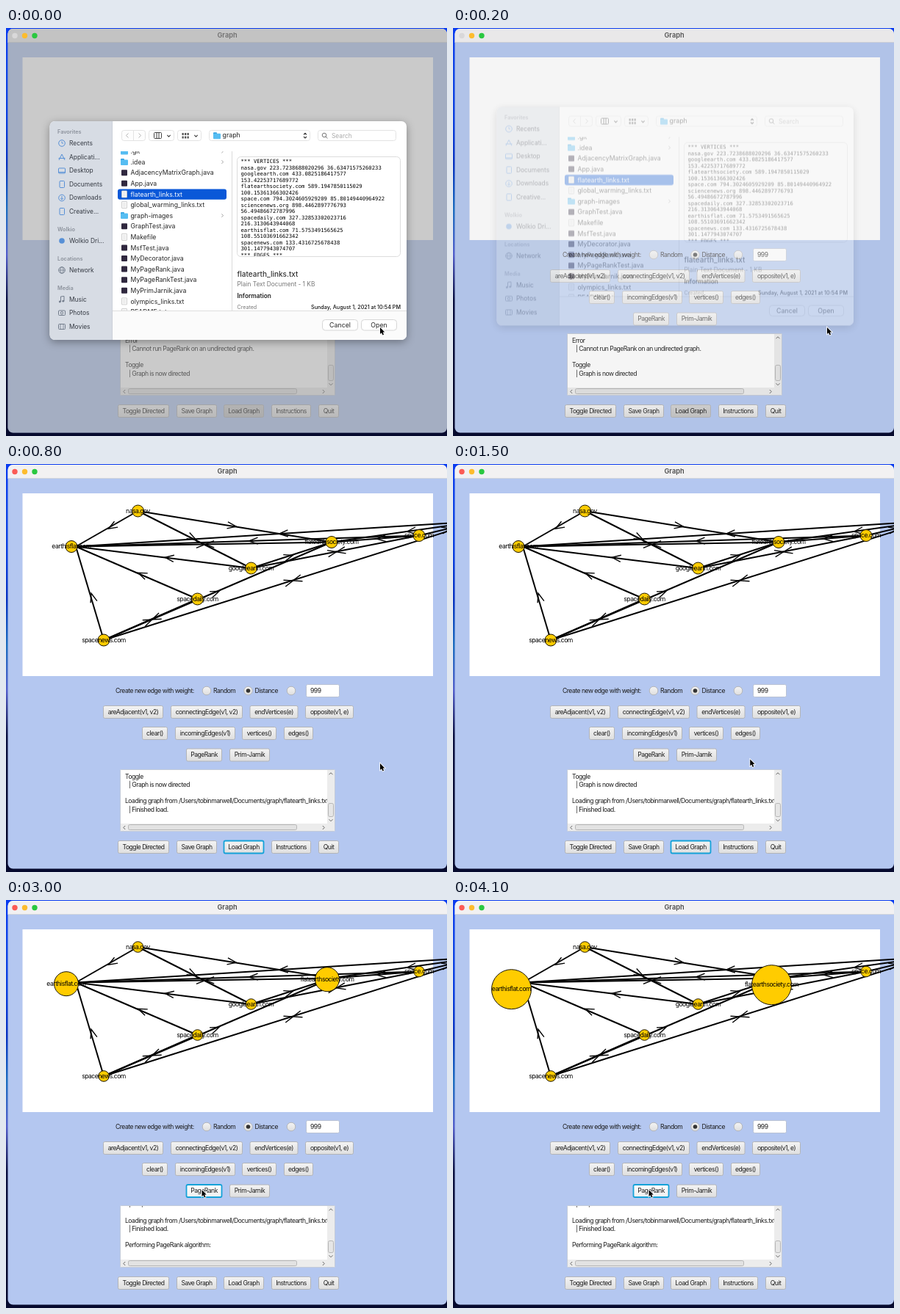
Recreate the animation shown at these times as an HTML page with a canvas. Size 600 by 556 pixels, loop 4200 ms.

```html
<!DOCTYPE html>
<html lang="en">
<head>
<meta charset="utf-8">
<title>Graph</title>
<style>
html, body { margin: 0; width: 100%; height: 100%; overflow: hidden; background: #060a2e; }
canvas { display: block; }
</style>
</head>
<body>
<canvas id="stage" width="600" height="556"></canvas>
<script>
const LOOP = 4200, STEP = 100;
const LOADED = 400, RANKED = 2500;
const stage = document.getElementById('stage').getContext('2d');
let c = stage;

// ---------- helpers ----------
function text(s, x, y, size, color = '#222', weight = 400, align = 'left', spacing = 0, family = 'Inter, sans-serif') {
  c.font = `${weight} ${size}px ${family}`;
  c.letterSpacing = spacing + 'px';
  c.textAlign = align;
  c.textBaseline = 'middle';
  c.fillStyle = color;
  c.fillText(s, x, y);
}
const label = (s, x, y, align, color = '#1c1c1c') => text(s, x, y, 8.6, color, 400, align, -0.5);

function paint(fill, stroke, width) {
  if (fill) { c.fillStyle = fill; c.fill(); }
  if (stroke) { c.strokeStyle = stroke; c.lineWidth = width; c.stroke(); }
}
function box(x, y, w, h, r, fill, stroke, width = 1) {
  c.beginPath();
  c.roundRect(x, y, w, h, r);
  paint(fill, stroke, width);
}
function disc(x, y, r, fill, stroke, width = 1) {
  c.beginPath();
  c.arc(x, y, r, 0, Math.PI * 2);
  paint(fill, stroke, width);
}
function path(points, color, width = 1) {
  c.beginPath();
  points.forEach(([x, y]) => c.lineTo(x, y));
  paint(null, color, width);
}
function clipTo(x, y, w, h, draw) {
  c.save();
  c.beginPath();
  c.rect(x, y, w, h);
  c.clip();
  draw();
  c.restore();
}
function shade(y, h, ...colors) {
  const g = c.createLinearGradient(0, y, 0, y + h);
  colors.forEach((col, i) => g.addColorStop(i / (colors.length - 1), col));
  return g;
}
// dir: 0 right, 1 down, 2 left, 3 up
function chevron(x, y, dir, size, color, width = 1) {
  c.save();
  c.translate(x, y);
  c.rotate(dir * Math.PI / 2);
  path([[-size / 2, -size], [size / 2, 0], [-size / 2, size]], color, width);
  c.restore();
}
// Piecewise linear value through [time, value] keys.
function track(t, keys) {
  if (t <= keys[0][0]) return keys[0][1];
  for (let i = 1; i < keys.length; i++) {
    const [t0, v0] = keys[i - 1], [t1, v1] = keys[i];
    if (t <= t1) return v0 + (v1 - v0) * (t - t0) / (t1 - t0);
  }
  return keys[keys.length - 1][1];
}

// ---------- graph ----------
const nodes = {
  nasa: [179.5, 64, 'nasa.gov'],
  earth: [89, 112.5, 'earthisflat.com'],
  google: [333.5, 142, 'googleearth.com'],
  society: [443, 106.5, 'flatearthsociety.com'],
  space: [562, 97.5, 'space.com'],
  daily: [260.5, 184, 'spacedaily.com'],
  news: [133, 240, 'spacenews.com'],
  science: [644, 78, 'sciencenews.org']
};
// A '=' link carries arrows both ways.
const links = ['nasa>earth', 'nasa>society', 'nasa>google', 'google>earth', 'google>society',
  'google=space', 'daily>earth', 'news>earth', 'news=daily', 'news>society', 'society=earth',
  'space>earth', 'science>earth', 'space>society', 'science>society', 'space=science', 'news=science'];
const growth = {
  r: [[RANKED - 100, 8], [RANKED, 9.5], [3000, 16.5], [4100, 27]],
  earthX: [[RANKED, 0], [3000, -7], [4100, -9.5]],
  societyX: [[RANKED, 0], [3000, -6], [4100, -9.5]],
  y: [[RANKED, 0], [3000, 1.7], [4100, 9.2]]
};

function arrow(x, y, angle) {
  const barb = side => [x - 13 * Math.cos(angle + side), y - 13 * Math.sin(angle + side)];
  path([barb(0.36), [x, y], barb(-0.36)], '#000', 1.4);
}
function drawLink(link) {
  const [a, b] = link.split(/[>=]/);
  const anchor = k => [nodes[k][0] + (k === 'earth' ? 6 : 0), nodes[k][1]];
  const [x0, y0] = anchor(a), [x1, y1] = anchor(b);
  path([[x0, y0], [x1, y1]], '#000', 2);
  const angle = Math.atan2(y1 - y0, x1 - x0);
  const mx = (x0 + x1) / 2 + 2, my = (y0 + y1) / 2;
  arrow(mx, my, angle);
  if (link.includes('=')) arrow(mx, my, angle + Math.PI);
}
function drawGraph(t) {
  links.forEach(drawLink);
  for (const [key, [x, y, name]] of Object.entries(nodes)) {
    const grows = key === 'earth' || key === 'society';
    let dx = 0, dy = 0, r = t < RANKED ? 8 : 7.3;
    if (grows && t >= RANKED) {
      r = track(t, growth.r);
      dx = track(t, growth[key + 'X']);
      dy = track(t, growth.y);
    }
    disc(x + dx, y + dy, r, '#fc0', '#1a1400');
    label(name, x + dx, y + dy, 'center', '#000');
  }
}

// ---------- main window ----------
const buttons = [
  [132, 338, 82, 'areAdjacent(v1, v2)'], [224, 338, 98, 'connectingEdge(v1, v2)'],
  [331.5, 338, 66, 'endVertices(e)'], [407, 338, 66, 'opposite(v1, e)'],
  [185, 367, 35, 'clear()'], [230, 367, 82, 'incomingEdges(v1)'],
  [321, 367, 47, 'vertices()'], [378, 367, 40, 'edges()'],
  [245, 396.5, 49, 'PageRank'], [304, 396.5, 55, 'Prim-Jarnik'],
  [152, 522, 70, 'Toggle Directed'], [232, 522, 55, 'Save Graph'],
  [296, 522, 55, 'Load Graph'], [361, 522, 54, 'Instructions'], [425, 522, 28, 'Quit']
];
function drawButton([x, y, w, name], t) {
  const pressed = name === 'Load Graph' && t < LOADED;
  const focused = name === (t < RANKED ? 'Load Graph' : 'PageRank') && t >= LOADED;
  const hover = name === 'PageRank' && t >= 2100;
  const fill = pressed ? shade(y - 9, 18, '#d2d2d2', '#c2c2c2')
    : hover ? shade(y - 9, 18, '#ffffff', '#efefef') : shade(y - 9, 18, '#f4f4f4', '#dedede');
  box(x + 0.5, y - 8.5, w - 1, 17, 2, fill, focused ? '#15a2d8' : '#b2b4b8', focused ? 1.8 : 1);
  label(name, x + w / 2, y, 'center');
}

function logLines(t) {
  const loading = 'Loading graph from /Users/tobinmarwell/Documents/graph/flatearth_links.txt';
  const toggled = ['Toggle', '| Graph is now directed', ''];
  if (t < LOADED) return ['Error', '| Cannot run PageRank on an undirected graph.', '', ...toggled];
  if (t < RANKED) return [...toggled, loading, '| Finished load.'];
  return ['| Graph is now directed', '', loading, '| Finished load.', '', 'Performing PageRank algorithm:'];
}
function drawLog(t) {
  box(155.5, 416.5, 292, 84, 1, '#fff', '#c3cbd9');
  const top = t < RANKED ? 426 : 414.5;
  clipTo(156, 417, 281, 73, () => logLines(t).forEach((s, i) =>
    label(s, s[0] === '|' ? 167 : 162, top + i * 11.25)));

  c.fillStyle = '#ececec';
  c.fillRect(437, 417, 10, 73);
  c.fillRect(156, 490, 291, 10);
  const thumb = t < LOADED ? 459 : t < RANKED ? 462 : 464;
  box(438.5, thumb + 0.5, 7, 480 - thumb, 2, '#e6e6e6', '#b5b5b5');
  box(166.5, 491.5, 229, 7, 2, '#e2e2e2', '#b5b5b5');
  chevron(442, 422, 3, 2.5, '#666');
  chevron(442, 485.5, 1, 2.5, '#666');
  chevron(161, 495.5, 2, 2.5, '#666');
  chevron(432, 495.5, 0, 2.5, '#666');
}

function drawDesktop() {
  c.fillStyle = shade(0, 556, '#0d3cf0', '#1146e6', '#0c40e0', '#0a34c0', '#1f6fc0', '#5560cc', '#0a1040', '#080d38', '#060a2e', '#060a2e');
  c.fillRect(0, 0, 600, 556);
  c.fillStyle = '#0a3cf0';
  c.fillRect(0, 0, 600, 8);
}
function drawWindow(t, veil) {
  c.save();
  c.beginPath();
  c.roundRect(2.5, 1, 597.5, 550.5, 7);
  c.clip();
  c.fillStyle = '#b4c7f0';
  c.fillRect(2, 1, 598, 551);
  c.fillStyle = '#f2f1f2';
  c.fillRect(2, 1, 598, 18.5);
  c.fillStyle = '#d2d5dc';
  c.fillRect(2, 19, 598, 1);
  text('Graph', 301, 10.5, 9.2, '#4b4b4b', 600, 'center');

  c.fillStyle = '#fff';
  c.fillRect(22.5, 40, 558.5, 249);
  if (t >= LOADED) drawGraph(t);

  label('Create new edge with weight:', 149, 309);
  [273, 329.5, 388].forEach(x => disc(x, 309, 5.8, shade(303, 12, '#f4f4f4', '#dedede'), '#b4b6ba'));
  disc(329.5, 309, 2.8, '#333');
  label('Random', 282, 309);
  label('Distance', 338.5, 309);
  box(408.5, 300.5, 45, 17, 2, '#fff', '#b9c2d4');
  label('999', 414, 309);
  buttons.forEach(b => drawButton(b, t));
  drawLog(t);

  c.fillStyle = `rgba(150,150,150,${veil})`;
  c.fillRect(2, 1, 598, 551);
  disc(12, 10.5, 3.7, t < LOADED ? '#d9d8d9' : '#fb5b55');
  disc(25.5, 10.5, 3.7, '#fdbc2e');
  disc(39, 10.5, 3.7, '#2ac840');
  c.restore();
}

// ---------- file dialog ----------
const BLUE = '#5790d6', GRAY = '#727c8b';
function folder(x, y) {
  box(x - 5, y - 4.5, 5, 4, 1, '#2f9fe0');
  box(x - 5, y - 3, 10, 7.5, 1, '#56bdf2');
}
function page(x, y) {
  box(x - 3.5, y - 4.5, 7, 9, 0.5, '#fafafa', '#c4c4c4', 0.8);
  for (let i = -2; i <= 2; i += 2) path([[x - 2, y + i], [x + 2, y + i]], '#d2d2d2', 0.6);
}
const sideIcons = {
  clock(x, y) { disc(x, y, 4.3, null, BLUE); path([[x, y - 2.6], [x, y], [x + 2, y]], BLUE, 0.9); },
  apps(x, y) { path([[x - 4, y + 4], [x, y - 4], [x + 4, y + 4]], BLUE); path([[x - 4.5, y + 1.5], [x + 4.5, y + 1.5]], BLUE); },
  desk(x, y) { box(x - 4.5, y - 3.5, 9, 7, 1, null, BLUE); path([[x - 4, y + 2], [x + 4, y + 2]], BLUE); },
  doc(x, y) { box(x - 3, y - 4.5, 6.5, 9, 1, null, BLUE); },
  down(x, y) { disc(x, y, 4.3, null, BLUE); path([[x, y - 2.5], [x, y + 2]], BLUE); chevron(x, y + 1.5, 1, 1.8, BLUE); },
  dot(x, y) { disc(x, y, 3.8, BLUE); },
  globe(x, y) { disc(x, y, 4.3, null, GRAY); path([[x - 4, y], [x + 4, y]], GRAY, 0.8); c.beginPath(); c.ellipse(x, y, 2, 4.3, 0, 0, 7); c.stroke(); },
  note(x, y) { path([[x - 1.5, y + 3], [x - 1.5, y - 4], [x + 3, y - 4.5], [x + 3, y + 2]], GRAY); disc(x - 2.7, y + 3, 1.4, GRAY); disc(x + 1.8, y + 2.2, 1.4, GRAY); },
  camera(x, y) { box(x - 4.5, y - 3, 9, 6.5, 1, null, GRAY); disc(x, y + 0.3, 1.7, null, GRAY); },
  film(x, y) { box(x - 4.5, y - 3.5, 9, 7, 1, null, GRAY); [-2, 2].forEach(d => path([[x + d, y - 3.5], [x + d, y + 3.5]], GRAY, 0.8)); }
};
const sidebar = [
  [142, 'Favorites'], [157, 'Recents', 'clock'], [176, 'Applicati...', 'apps'], [194.5, 'Desktop', 'desk'],
  [213, 'Documents', 'doc'], [231.5, 'Downloads', 'down'], [250, 'Creative...', 'doc'],
  [274.5, 'Wolkio'], [290, 'Wolkio Dri...', 'dot'], [314.5, 'Locations'], [330, 'Network', 'globe'],
  [354.5, 'Media'], [370, 'Music', 'note'], [388, 'Photos', 'camera'], [407, 'Movies', 'film']
];
const files = ['.git', '.idea', 'AdjacencyMatrixGraph.java', 'App.java', 'flatearth_links.txt',
  'global_warming_links.txt', 'graph-images', 'GraphTest.java', 'Makefile', 'MsfTest.java',
  'MyDecorator.java', 'MyPageRank.java', 'MyPageRankTest.java', 'MyPrimJarnik.java',
  'olympics_links.txt', 'README.txt'];
const preview = `*** VERTICES ***
nasa.gov 223.7238688020296 36.63471575260233
googleearth.com 433.0825186417577
153.42253717689772
flatearthsociety.com 589.1947850115029
100.15361366302426
space.com 794.3024605929209 85.80149440964922
sciencenews.org 898.4462897776793
56.49486672787996
spacedaily.com 327.32853302023716
216.3130643944068
earthisflat.com 71.5753491565625
108.55103691662342
spacenews.com 133.4316725678438
301.1477943074707
*** EDGES ***`.split('\n');

function drawFiles() {
  files.forEach((name, i) => {
    const y = 168 + i * 14.6, selected = i === 4;
    if (selected) box(152, y - 7, 148, 14.4, 3, '#0a58d8');
    if (name.endsWith('.java')) box(157, y - 4, 8, 8, 1, '#30283f');
    else if (name.endsWith('.txt') || name === 'Makefile') page(161, y);
    else { folder(161, y); chevron(294.5, y, 0, 2.2, '#a0a0a0'); }
    text(name, 169.5, y + 0.6, 8.7, selected ? '#fff' : '#262626');
  });
}
function drawToolbar() {
  box(157.5, 139.5, 32, 14, 3, '#fdfdfd', '#e3e3e3');
  path([[173.5, 140], [173.5, 153]], '#e3e3e3');
  chevron(165, 146.5, 2, 3, '#b5b5b5');
  chevron(182, 146.5, 0, 3, '#b5b5b5');
  [[194.5, 34], [233.5, 32]].forEach(([x, w]) => {
    box(x, 139.5, w, 14, 3, '#fff', '#e3e3e3');
    chevron(x + w - 7, 147, 1, 2.2, '#444', 1.1);
  });
  box(201.5, 142.5, 10, 8, 1, null, '#444');
  [205, 208].forEach(x => path([[x, 143], [x, 150]], '#444'));
  for (let i = 0; i < 6; i++) box(239.5 + i % 3 * 3.5, 143 + (i > 2 ? 4.5 : 0), 2.3, 3, 0.5, '#555');
  box(276.5, 139.5, 137, 14, 3, '#fff', '#e3e3e3');
  folder(287, 146.7);
  text('graph', 294.5, 146.5, 8.8, '#262626');
  chevron(407, 144.3, 3, 2, '#333', 1.1);
  chevron(407, 149, 1, 2, '#333', 1.1);
  box(424.5, 139.5, 106, 14, 3, '#fff', '#e3e3e3');
  disc(433, 146, 2.8, null, '#777');
  path([[435, 148], [437.3, 150.5]], '#777');
  text('Search', 443, 147, 8.4, '#aaa');
}
function drawDialog() {
  c.shadowColor = 'rgba(0,0,0,.35)';
  c.shadowBlur = 12;
  c.shadowOffsetY = 3;
  box(59.5, 127, 485.5, 298, 7, '#fff');
  c.shadowColor = 'transparent';
  box(59.5, 127, 85.5, 298, [7, 0, 0, 7], '#d7dce4');
  box(145, 386, 400, 39, [0, 0, 7, 0], '#fbfbfb');
  path([[144.5, 127], [144.5, 425]], '#cbd0d8');
  path([[145, 385.5], [545, 385.5]], '#dedede');
  path([[307.5, 168], [307.5, 385]], '#dadada');

  sidebar.forEach(([y, name, icon]) => {
    if (!icon) return text(name, 70, y, 7.3, '#8b919b', 600);
    sideIcons[icon](76, y);
    text(name, 86, y, 8.4, '#343942');
  });
  drawToolbar();
  clipTo(145, 168, 162, 217, drawFiles);

  box(314.5, 175.5, 222, 136, 5, '#fff', '#dcdcdc');
  clipTo(315, 176, 221, 135, () => preview.forEach((s, i) =>
    text(s, 319.5, 182.2 + i * 8.52, 7.23, '#000', 400, 'left', 0, '"DejaVu Sans Mono", monospace')));
  text('flatearth_links.txt', 314.5, 336, 10, '#333', 500);
  text('Plain Text Document - 1 KB', 314.5, 350, 8.3, '#777');
  text('Information', 314.5, 366, 8.3, '#222', 600);
  text('Created', 314.5, 381, 7.1, '#777');
  text('Sunday, August 1, 2021 at 10:54 PM', 537, 381, 7.2, '#111', 500, 'right');
  box(430.5, 397.5, 48, 14.5, 4, '#fff', '#d6d6d6');
  box(483.5, 397.5, 48, 14.5, 4, '#fff', '#d6d6d6');
  text('Cancel', 454.5, 405, 8.8, '#262626', 400, 'center');
  text('Open', 507.5, 405, 8.8, '#262626', 400, 'center');
}
const dialog = document.createElement('canvas');
dialog.width = 600;
dialog.height = 556;
c = dialog.getContext('2d');
drawDialog();
c = stage;

const sheet = {
  veil: [[0, 0.5], [100, 0.36], [200, 0.1], [300, 0]],
  alpha: [[0, 1], [100, 0.74], [200, 0.33], [300, 0]],
  y: [[0, 0], [100, -8], [200, -19.5], [300, -26]]
};

// ---------- cursor ----------
function drawCursor(t) {
  const p = Math.min(1, Math.max(0, (t - 1000) / 1100));
  const e = p * p * (3 - 2 * p);
  c.save();
  c.translate(509 - 242.5 * e, 408 - 13 * e);
  c.beginPath();
  [[0, 0], [0, 9], [2, 7.2], [3.5, 10.5], [5, 9.8], [3.7, 6.6], [6.3, 6.4]].forEach(([x, y]) => c.lineTo(x, y));
  c.closePath();
  paint(null, '#fff', 1.6);
  paint('#000');
  c.restore();
}

function frame(now) {
  const t = Math.floor(now % LOOP / STEP) * STEP;
  drawDesktop();
  drawWindow(t, track(t, sheet.veil));
  c.globalAlpha = track(t, sheet.alpha);
  c.drawImage(dialog, 0, track(t, sheet.y));
  c.globalAlpha = 1;
  drawCursor(t);
}
const start = performance.now();
(function tick() {
  frame(performance.now() - start);
  requestAnimationFrame(tick);
})();
</script>
</body>
</html>
```
